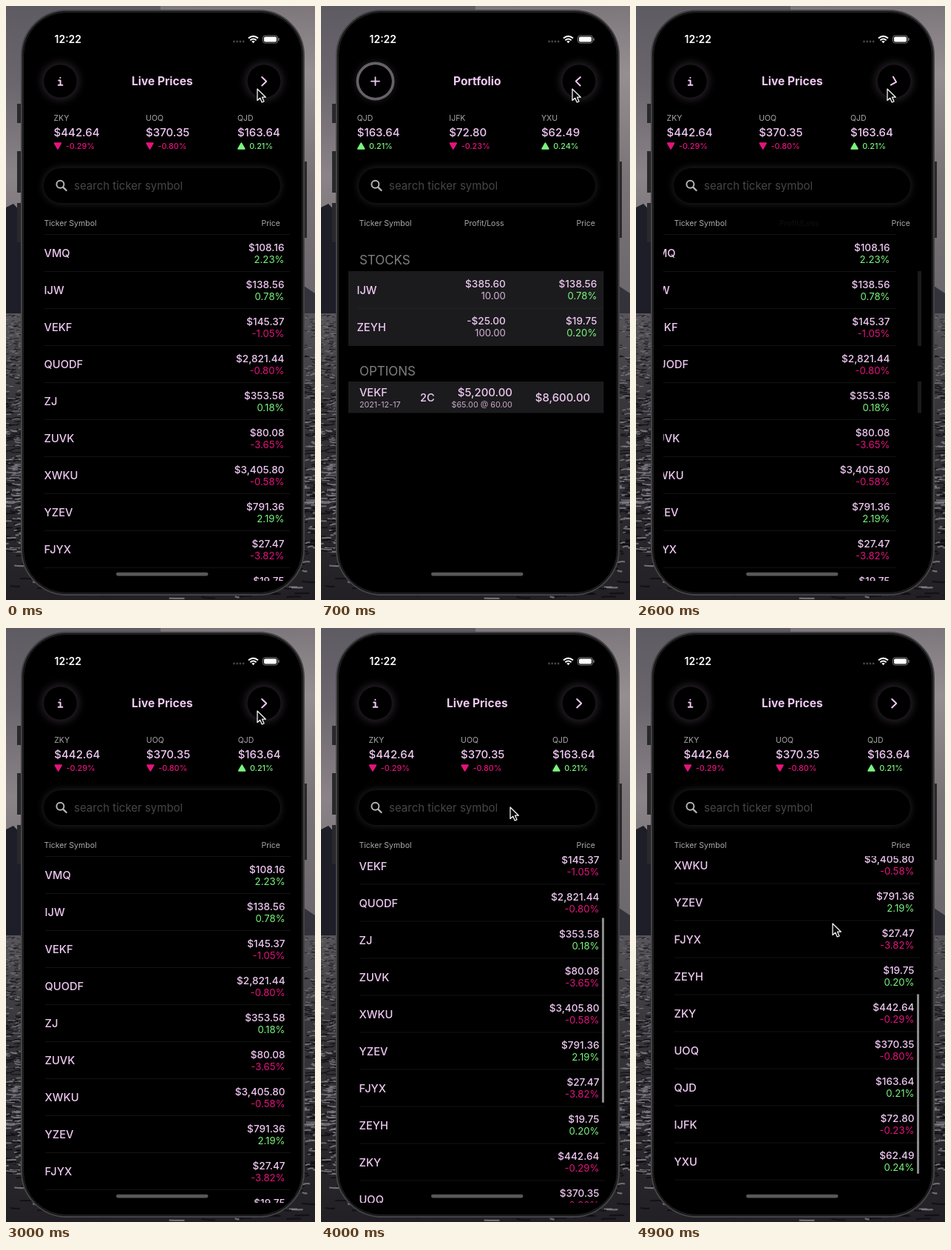
An HTML page that plays this animation: 418x802 px, repeating every 5 s.

```html
<!DOCTYPE html>
<html lang="en">
<head>
<meta charset="utf-8">
<title>Live Prices</title>
<style>
  html, body { margin: 0; width: 100%; height: 100%; overflow: hidden; background: #000; }
  svg { display: block; width: 418px; height: 802px; font-family: Inter, Roboto, sans-serif; }
</style>
</head>
<body>
<svg id="stage" viewBox="0 0 418 802" xmlns="http://www.w3.org/2000/svg">
  <defs>
    <linearGradient id="skyL" x1="0" y1="0" x2="0" y2="1">
      <stop offset="0" stop-color="#5f5b63"/><stop offset=".25" stop-color="#6b666d"/>
      <stop offset=".55" stop-color="#8a8388"/><stop offset="1" stop-color="#686469"/>
    </linearGradient>
    <linearGradient id="skyR" x1="0" y1="0" x2="0" y2="1">
      <stop offset="0" stop-color="#7d777c"/><stop offset=".22" stop-color="#968f91"/>
      <stop offset=".55" stop-color="#7a7477"/><stop offset="1" stop-color="#6b666c"/>
    </linearGradient>
    <linearGradient id="water" x1="0" y1="0" x2="0" y2="1">
      <stop offset="0" stop-color="#59565b"/><stop offset=".3" stop-color="#39373c"/>
      <stop offset="1" stop-color="#222025"/>
    </linearGradient>
    <filter id="glow" x="-60%" y="-60%" width="220%" height="220%"><feGaussianBlur stdDeviation="6"/></filter>
    <clipPath id="screen"><rect x="27" y="11" width="370" height="779" rx="54"/></clipPath>
    <clipPath id="list"><rect x="37" y="308" width="349" height="468"/></clipPath>
  </defs>
  <g id="photo">
    <rect width="209" height="416" fill="url(#skyL)"/>
    <rect x="209" width="209" height="416" fill="url(#skyR)"/>
    <path d="M0 272L10 267L21 279L60 300V416H0Z" fill="#1d1e28"/>
    <path d="M418 388L400 376V416H418Z" fill="#34333c"/>
    <rect y="415" width="418" height="387" fill="url(#water)"/>
  </g>
  <g id="phone">
    <path d="M17.5 132V158M17.5 196V252M17.5 266V319M404.5 210V313" stroke="#29282b" stroke-width="5"/>
    <rect x="21" y="6" width="382" height="789" rx="61" fill="#111" stroke="#444346" stroke-width="2"/>
    <rect x="23.5" y="8.5" width="377" height="784" rx="58" fill="#000" stroke="#262628"/>
  </g>
  <g clip-path="url(#screen)">
    <g id="status"></g>
    <g id="head"></g>
    <g id="stats"></g>
    <g id="search"></g>
    <g id="columns"></g>
    <g clip-path="url(#list)">
      <g id="live"></g>
      <g id="folio"></g>
      <rect id="bar" x="380" width="3" rx="1.5" fill="#8b8b8d"/>
    </g>
    <rect x="149" y="764.7" width="124.5" height="4.8" rx="2.4" fill="#58585a"/>
  </g>
  <path id="cursor" d="M0 0V15.6L3.7 12.3L6.2 18L9 16.8L6.6 11.2H11.4Z" fill="#0a0a0a" stroke="#f4f4f4" stroke-width="1.3" stroke-linejoin="round"/>
</svg>
<script>
const LOOP = 5000, STEP = 100;
const OPEN = 260, CLOSE = 2322;
const SLIDE = 377, STAT_SHIFT = 262;
const PINK = '#f0c9f3', RED = '#e3147c', GREEN = '#79f57d', GREY = '#a9a9ab';
const $ = id => document.getElementById(id);

function add(parent, tag, attrs) {
  const el = document.createElementNS('http://www.w3.org/2000/svg', tag);
  for (const k in attrs) el.setAttribute(k, attrs[k]);
  parent.appendChild(el);
  return el;
}

// y is the middle of the capitals
function text(parent, str, x, y, size, fill, weight = 400, anchor = 'start') {
  const el = add(parent, 'text', {
    x, y: y + size * 0.364, fill, 'font-size': size, 'font-weight': weight, 'text-anchor': anchor
  });
  el.textContent = str;
  return el;
}

const trend = pct => pct.startsWith('-') ? RED : GREEN;

const quotes = [
  ['VMQ', '$108.16', '2.23%'], ['IJW', '$138.56', '0.78%'], ['VEKF', '$145.37', '-1.05%'],
  ['QUODF', '$2,821.44', '-0.80%'], ['ZJ', '$353.58', '0.18%'], ['ZUVK', '$80.08', '-3.65%'],
  ['XWKU', '$3,405.80', '-0.58%'], ['YZEV', '$791.36', '2.19%'], ['FJYX', '$27.47', '-3.82%'],
  ['ZEYH', '$19.75', '0.20%'], ['ZKY', '$442.64', '-0.29%'], ['UOQ', '$370.35', '-0.80%'],
  ['QJD', '$163.64', '0.21%'], ['IJFK', '$72.80', '-0.23%'], ['YXU', '$62.49', '0.24%']
];

function drawWaves() {
  let seed = 7;
  const rnd = () => (seed = seed * 16807 % 2147483647) / 2147483647;
  for (let i = 0; i < 620; i++) {
    const depth = rnd(), y = 418 + depth * 382;
    const x = y > 735 ? rnd() * 418 : rnd() < 0.6 ? rnd() * 24 - 4 : 400 + rnd() * 18;
    const w = 3 + rnd() * (4 + depth * 14), lift = (rnd() - 0.5) * 6;
    add($('photo'), 'path', {
      d: `M${x} ${y}q${w / 2} ${lift} ${w} ${lift / 2}`, fill: 'none',
      stroke: rnd() < 0.58 ? '#0f0e12' : '#858289', 'stroke-width': 0.8 + depth * 1.5, opacity: 0.8
    });
  }
}

function drawStatus() {
  const g = $('status');
  text(g, '12:22', 65.5, 45, 14, '#fff', 600);
  for (let i = 0; i < 4; i++) add(g, 'circle', { cx: 308.5 + i * 4.2, cy: 48, r: 1.4, fill: '#454547' });
  add(g, 'path', {
    d: 'M328 43.6Q334.5 37.8 341 43.6M330.4 46.3Q334.5 42.8 338.6 46.3',
    fill: 'none', stroke: '#fff', 'stroke-width': 2
  });
  add(g, 'path', { d: 'M332.2 47.8Q334.5 46 336.8 47.8L334.5 50.2Z', fill: '#fff' });
  add(g, 'rect', { x: 347.5, y: 40, width: 20, height: 10, rx: 3, fill: 'none', stroke: '#7d7d7f' });
  add(g, 'rect', { x: 349, y: 41.5, width: 17, height: 7, rx: 1.7, fill: '#fff' });
  add(g, 'path', { d: 'M369 43.3V46.7', stroke: '#7d7d7f', 'stroke-width': 1.4 });
}

function drawHead() {
  const g = $('head'), ui = {};
  const glow = cx => add(g, 'circle', { cx, cy: 101.5, r: 25, fill: PINK, opacity: 0.18, filter: 'url(#glow)' });
  const disc = cx => add(g, 'circle', { cx, cy: 101.5, r: 22.3, fill: '#000' });
  const icon = (d, width) => add(g, 'path', {
    d, fill: 'none', stroke: PINK, 'stroke-width': width, 'stroke-linecap': 'round', 'stroke-linejoin': 'round'
  });
  glow(73.5);
  ui.ring = add(g, 'circle', { cx: 73.5, cy: 101.5, fill: 'none', stroke: '#e4e4e4', 'stroke-width': 4 });
  disc(73.5);
  glow(349);
  disc(349);
  ui.info = icon('M71.2 100.4H73.6V106.6M70.8 106.8H76.4M73.4 96.8V96.9', 2);
  ui.plus = icon('M68 101.6H79M73.5 96.1V107.1', 1.8);
  ui.arrow = icon('M346.2 96L352.2 101.7L346.2 107.4', 2);
  ui.liveTitle = text(g, 'Live Prices', 211.3, 101.8, 15.5, PINK, 700, 'middle');
  ui.folioTitle = text(g, 'Portfolio', 211.3, 101.8, 15.5, PINK, 700, 'middle');
  return ui;
}

function drawStats() {
  quotes.slice(10).forEach(([name, price, pct], i) => {
    const x = 64.5 + i * 124.6 - (i > 1 ? 0.8 : 0), down = pct.startsWith('-');
    const g = $('stats'), fill = trend(pct);
    text(g, name, x, 151, 10.5, GREY);
    text(g, price, x, 170.3, 15, PINK, 500);
    add(g, 'path', {
      d: down ? `M${x + 1.2} 185.2h8.6l-4.3 7.6z` : `M${x + 1.2} 192.8h8.6l-4.3 -7.6z`,
      fill, stroke: fill, 'stroke-width': 1.8, 'stroke-linejoin': 'round'
    });
    text(g, pct, x + 16.3, 189, 10.8, fill, 500);
  });
}

function drawSearch() {
  const g = $('search'), box = { x: 51, y: 219, width: 320, height: 47, rx: 23.5 };
  add(g, 'rect', { ...box, fill: PINK, opacity: 0.18, filter: 'url(#glow)' });
  add(g, 'rect', { ...box, fill: '#000' });
  add(g, 'circle', { cx: 73.4, cy: 240.8, r: 5, fill: 'none', stroke: '#b5b3b6', 'stroke-width': 2 });
  add(g, 'path', { d: 'M77.2 244.6L81.6 249', stroke: '#b5b3b6', 'stroke-width': 2.3, 'stroke-linecap': 'round' });
  text(g, 'search ticker symbol', 92, 243, 15, '#464548');
}

function drawColumns() {
  const g = $('columns');
  text(g, 'Ticker Symbol', 51.5, 293.5, 10.5, GREY);
  text(g, 'Price', 371, 293.5, 10.5, GREY, 400, 'end');
  return text(g, 'Profit/Loss', 247.5, 293.5, 10.5, GREY, 400, 'end');
}

const rule = (g, x, y, stroke) => add(g, 'path', { d: `M${x} ${y}H384`, stroke, 'stroke-width': 0.8 });

function amountCell(g, x, y, amount, note, noteFill) {
  text(g, amount, x, y - 8, 13.6, PINK, 500, 'end');
  text(g, note, x, y + 8, 13.2, noteFill, 400, 'end');
}

function drawLive() {
  const g = add($('live'), 'g', {});
  rule(g, 52, 308.5, '#19191b');
  quotes.forEach(([name, price, pct], i) => {
    const y = 334 + i * 50;
    text(g, name, 51.5, y, 14.7, PINK, 500);
    amountCell(g, 376.5, y, price, pct, trend(pct));
    rule(g, 52, y + 24.5, '#19191b');
  });
  return g;
}

function drawFolio() {
  const g = $('folio');
  const panel = (y, height) => add(g, 'rect', { x: 37, y, width: 348.5, height, fill: '#1b1b1d' });
  text(g, 'STOCKS', 55, 343, 17, '#7f7f82');
  panel(358, 101);
  rule(g, 52, 408.5, '#272729');
  [[1, '$385.60', '10.00'], [9, '-$25.00', '100.00']].forEach(([id, profit, count], i) => {
    const y = 383.5 + i * 50, [name, price, pct] = quotes[id];
    text(g, name, 51.5, y, 14.7, PINK, 500);
    amountCell(g, 253, y, profit, count, '#d4b2d7');
    amountCell(g, 376.5, y, price, pct, trend(pct));
  });
  text(g, 'OPTIONS', 55, 492.5, 17, '#7f7f82');
  panel(507, 42.5);
  text(g, quotes[2][0], 55, 522, 14.7, PINK, 500);
  text(g, '2021-12-17', 55, 537.7, 10.8, '#c9aacc');
  text(g, '2C', 137, 529, 14.7, PINK, 500);
  text(g, '$5,200.00', 262, 522, 14.9, PINK, 500, 'end');
  text(g, '$65.00 @ 60.00', 262, 537.7, 10.8, '#c9aacc', 400, 'end');
  text(g, '$8,600.00', 367.3, 529, 14.9, PINK, 500, 'end');
}

// share of the way still to go, in a spring of response .55 s and damping .825
function spring(ms) {
  const s = ms / 1000, w = 2 * Math.PI / 0.55, z = 0.825, d = Math.sqrt(1 - z * z);
  return Math.exp(-z * w * s) * (Math.cos(w * d * s) + z / d * Math.sin(w * d * s));
}

// cubic-bezier(0, 0, .58, 1)
function easeOut(x) {
  if (x >= 1) return 1;
  let lo = 0, hi = 1;
  for (let i = 0; i < 20; i++) {
    const u = (lo + hi) / 2;
    if (1.74 * (1 - u) * u * u + u * u * u < x) lo = u; else hi = u;
  }
  return 3 * (1 - lo) * lo * lo + lo * lo * lo;
}

function track(keys, t, col = 1) {
  const i = keys.findIndex(k => k[0] > t);
  if (i === 0) return keys[0][col];
  if (i < 0) return keys[keys.length - 1][col];
  const a = keys[i - 1], b = keys[i];
  return a[col] + (b[col] - a[col]) * (t - a[0]) / (b[0] - a[0]);
}

const pointer = [
  [3000, 340, 112], [3100, 334, 140], [3300, 290, 290], [3500, 257, 366],
  [3600, 257, 357], [3800, 256, 318], [4000, 256, 242], [4200, 260, 310], [4400, 265, 385], [4900, 266, 399]
];
const scrolling = [
  [3600, 0], [3800, 36], [4000, 112.5], [4200, 200], [4400, 262], [4600, 299], [4800, 313.5]
];

drawWaves();
drawStatus();
const ui = drawHead();
drawStats();
drawSearch();
const profitLabel = drawColumns();
const rows = drawLive();
drawFolio();

const move = (el, x, y = 0) => el.setAttribute('transform', `translate(${x} ${y})`);
const show = (el, opacity) => el.setAttribute('opacity', opacity);

function render(t) {
  const open = t >= OPEN && t < CLOSE;
  const p = t < OPEN ? 0 : open ? 1 - spring(t - OPEN) : spring(t - CLOSE);

  move($('live'), -SLIDE * p);
  move($('folio'), SLIDE * (1 - p));
  move($('stats'), -STAT_SHIFT * p);
  show(profitLabel, Math.min(1, Math.max(0, p)));
  ui.arrow.setAttribute('transform', `rotate(${180 * p} 348.5 101.7)`);
  for (const el of [ui.info, ui.liveTitle]) show(el, open ? 0 : 1);
  for (const el of [ui.plus, ui.folioTitle]) show(el, open ? 1 : 0);

  const grow = open ? easeOut((t - OPEN) / 1000) : 0;
  ui.ring.setAttribute('r', 38.8 * grow);
  show(ui.ring, open ? 1 - grow : 0);

  const scroll = track(scrolling, t);
  move(rows, 0, -scroll);
  const top = 391 + (scroll - 112.5) * 0.512;
  $('bar').setAttribute('y', top);
  $('bar').setAttribute('height', Math.min(250, 737 - top));
  show($('bar'), scroll > 0 ? 1 : 0);

  move($('cursor'), track(pointer, t), track(pointer, t, 2));
}

const start = performance.now();
function tick() {
  const t = (performance.now() - start) % LOOP;
  render(Math.floor(t / STEP) * STEP);
  requestAnimationFrame(tick);
}
tick();
</script>
</body>
</html>
```
